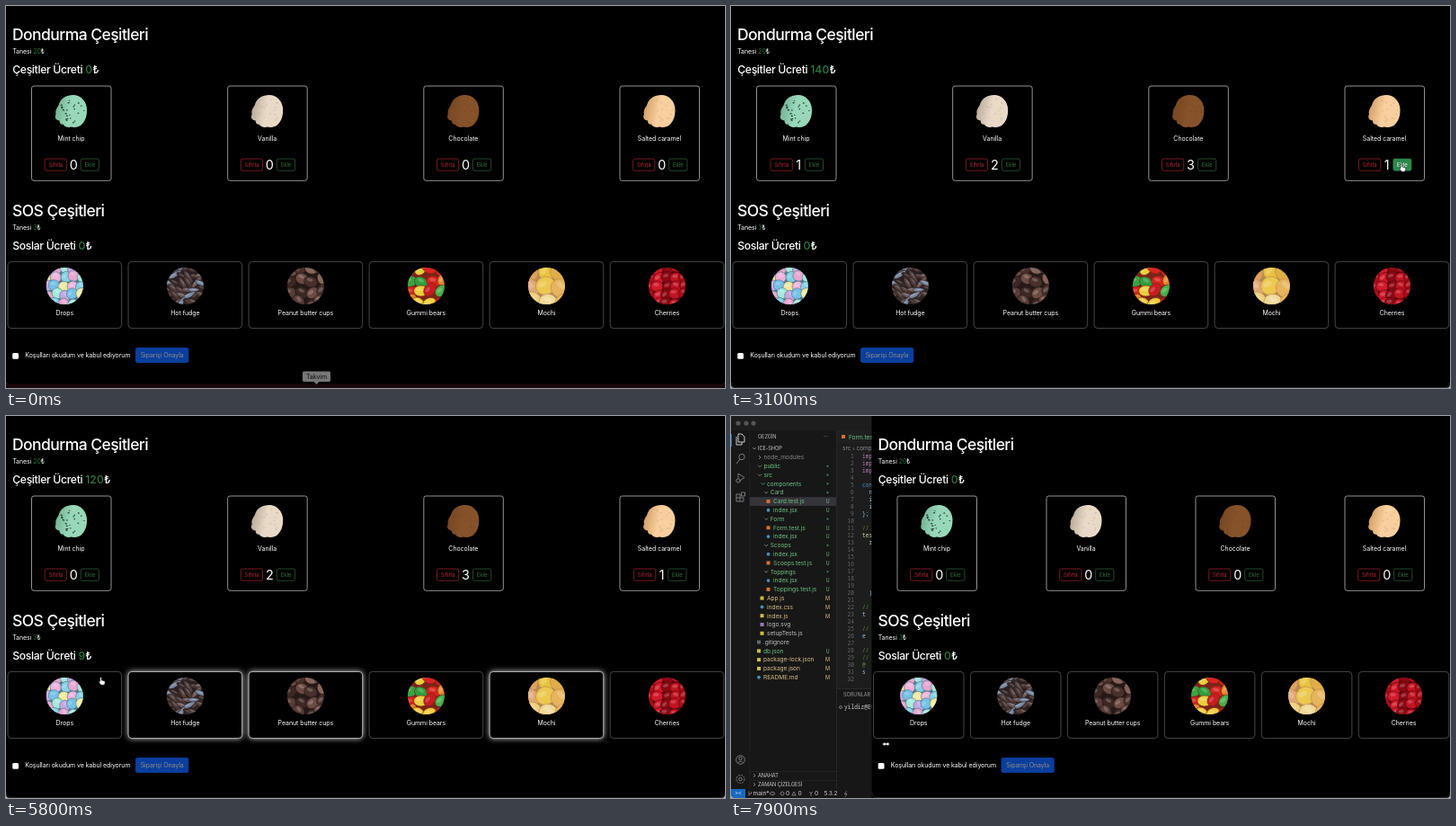
These frames come from a looping animation (800x425 px, 8 s). An HTML page:

```html
<!DOCTYPE html>
<html lang="tr">
<head>
<meta charset="utf-8">
<style>
html, body { margin: 0; width: 100%; height: 100%; overflow: hidden; background: #000; }
svg { display: block; width: 800px; height: 425px; }
text { font: 7px Inter, "Open Sans", sans-serif; letter-spacing: -.01em; fill: #fff; white-space: pre; }
.h1 { font-size: 17.5px; font-weight: 450; letter-spacing: -.032em; }
.h2 { font-size: 12.2px; font-weight: 450; letter-spacing: -.027em; }
.price { letter-spacing: .01em; }
.count { font-size: 14.4px; }
.btn { font-size: 6px; }
.mid { text-anchor: middle; }
.green { fill: #2c7c40; }
.ide { font-size: 6.6px; }
.tiny { font-size: 5.6px; }
.code { font: 6.2px "Noto Sans Mono", "DejaVu Sans Mono", monospace; letter-spacing: 0; }
.line { fill: none; stroke: #858585; stroke-width: .9; }
</style>
</head>
<body>
<svg id="stage" viewBox="0 0 800 425"></svg>
<script>
const LOOP = 8000, STEP = 100, EDGE = 156.5;
const stage = document.getElementById('stage');

let seed = 7;
const rand = () => (seed = seed * 16807 % 2147483647) / 2147483647;
const range = n => [...Array(n).keys()];
const text = (x, y, s, cls = '', fill = '') =>
  `<text x="${x}" y="${y}" class="${cls}"${fill && ` style="fill:${fill}"`}>${s}</text>`;
const rect = (x, y, w, h, fill, more = '') =>
  `<rect x="${x}" y="${y}" width="${w}" height="${h}" fill="${fill}" ${more}/>`;
const oval = (x, y, rx, ry, fill, more = '') =>
  `<ellipse cx="${x}" cy="${y}" rx="${rx}" ry="${ry}" fill="${fill}" ${more}/>`;

/* Code editor behind the page */
const TREE = [
  [0, 'node_modules', 'd', ''], [0, 'public', 'o', '•'], [0, 'src', 'o', '•'],
  [1, 'components', 'o', '•'], [2, 'Card', 'o', '•'], [3, 'Card.test.js', 't', 'U'],
  [3, 'index.jsx', 'x', 'U'], [2, 'Form', 'o', '•'], [3, 'Form.test.js', 't', 'U'],
  [3, 'index.jsx', 'x', 'U'], [2, 'Scoops', 'o', '•'], [3, 'index.jsx', 'x', 'U'],
  [3, 'Scoops.test.js', 't', 'U'], [2, 'Toppings', 'o', '•'], [3, 'index.jsx', 'x', 'U'],
  [3, 'Toppings.test.js', 't', 'U'], [1, 'App.js', 'j', 'M'], [1, 'index.css', 'x', 'M'],
  [1, 'index.js', 'j', 'M'], [1, 'logo.svg', 'v', ''], [1, 'setupTests.js', 'j', ''],
  [0, '.gitignore', 'g', ''], [0, 'db.json', 'j', 'U'], [0, 'package-lock.json', 'j', 'M'],
  [0, 'package.json', 'j', 'M'], [0, 'README.md', 'x', 'M']
];
const ICON = { t: '#d9702f', x: '#4b8fb5', j: '#cbbf45', v: '#a074c4', g: '#5a6a70' };
const STATUS = { U: '#6fbf84', '•': '#6fbf84', M: '#d9bd86', '': '#c0c0c0' };

const chevron = (x, y, open) =>
  `<path class="line" d="${open ? `M${x - 2} ${y - 1}l2 2 2-2` : `M${x - 1} ${y - 2}l2 2-2 2`}"/>`;

function treeRow([depth, name, kind, status], i) {
  const y = 46 + i * 9.79, folder = kind === 'd' || kind === 'o';
  const x = folder ? 32 + depth * 3.6 : [31, 34.5, 38, 41.5][depth];
  const nameX = folder ? x + 4.5 : x + (depth ? 5.6 : 5);
  const color = kind === 'd' ? '#858585' : STATUS[status];
  return (folder ? chevron(x, y, kind === 'o')
    : kind === 'x' ? oval(x, y, 1.9, 1.9, ICON.x) : rect(x - 2, y - 2, 4, 4, ICON[kind])) +
    text(nameX, y + 2.3, name, 'ide', color) +
    (status === '•' ? oval(107.5, y, 1.1, 1.1, '#4c8058') : text(107.5, y + 2.3, status, 'tiny mid', color));
}

const CODE = {
  1: 'imp', 2: 'imp', 3: 'imp', 5: 'cons', 6: '  n', 7: '  i', 8: '  i', 9: '};', 11: '//', 12: 'test',
  13: '  r', 20: '  )', 22: '//', 23: 't', 25: '//', 26: 'e', 28: '//', 29: '//', 30: '@', 31: 's'
};
const codeColor = s => s === '//' || s === '@' ? '#5f8a4a' : s === 'imp' ? '#b57db0'
  : s === 'cons' ? '#4f93c8' : s === 'test' ? '#d3d39d' : '#9cc5dc';

function editor() {
  const icons = `<g class="line">
    <path style="stroke:#ddd" d="M8 20h4l3 3v6H8zM6 23v9h6v-3"/>
    <circle cx="12" cy="45.5" r="3.2"/><path d="M10 48l-4 5"/>
    <path d="M8 64l7 4.5-6 4M8 64v5"/><circle cx="8" cy="72" r="2.2"/>
    <path d="M6 87h4v4h4v4H6zM6 91h4v4M11.5 85h4v4h-4z"/>
    <circle cx="10.5" cy="382.5" r="4.8"/><circle cx="10.5" cy="381" r="1.7"/><path d="M7.5 386q3-4 6 0"/>
    <circle cx="10.5" cy="404" r="4.5" stroke-dasharray="2 1"/><circle cx="10.5" cy="404" r="1.8"/></g>`;
  return rect(0, 0, 200, 425, '#1d1d1d') + rect(0, 16, 117, 399, '#171717') +
    [8, 17, 25].map(x => oval(x, 8, 2.6, 2.6, '#555')).join('') +
    rect(20.5, 16, .6, 399, '#292929') + rect(117, 16, .7, 399, '#2b2b2b') + rect(0, 20, .9, 14, '#2677d0') + icons +
    text(30, 25.3, 'GEZGİN', 'tiny', '#bbb') + text(103, 25, '···', 'ide', '#bbb') +
    chevron(26, 36, true) + text(30, 38.2, 'ICE-SHOP', 'tiny', '#ccc') +
    rect(21, 90.2, 96, 9.8, '#34343a') + TREE.map(treeRow).join('') +
    rect(21, 395, 96, .6, '#2b2b2b') + rect(21, 405, 96, .6, '#2b2b2b') +
    chevron(26, 400, false) + text(30, 402.2, 'ANAHAT', 'tiny', '#ccc') +
    chevron(26, 410, false) + text(30, 412.2, 'ZAMAN ÇİZELGESİ', 'tiny', '#ccc') +
    rect(118, 16, 82, 14, '#202020') + rect(123, 21, 4, 4, ICON.t) + text(131, 25.5, 'Form.test.js', 'ide', '#6fbf84') +
    text(124, 38, 'src › components', 'ide', '#8a8a8a') +
    range(32).map(i => {
      const n = i + 1, y = 47 + i * 8, s = CODE[n] || '';
      return text(n < 10 ? 133 : 129.5, y, n, 'code', '#666') + text(146, y, s, 'code', codeColor(s));
    }).join('') +
    rect(118, 303, 82, 112, '#171717') + rect(118, 303, 82, .7, '#333') +
    text(125, 312, 'SORUNLAR', 'tiny', '#999') +
    '<circle class="line" cx="122" cy="324" r="1.5"/>' + text(126, 326, 'yildiz@Ev-1', 'code', '#ccc') +
    rect(0, 415, 200, 10, '#171717') + rect(0, 415, 16, 10, '#1769c0') + text(8, 422, '&gt;&lt;', 'tiny mid') +
    '<path class="line" d="M20 417.5v5M20 421q3 0 3-3"/>' +
    text(24.5, 422.2, 'main*', 'ide', '#ccc') + '<ellipse class="line" cx="46" cy="420" rx="2.6" ry="1.7"/>' +
    '<circle class="line" cx="57" cy="420" r="2"/><path class="line" d="M70 418l2.2 4h-4.4z"/>' +
    text(61, 422.2, '0', 'ide', '#ccc') + text(74.5, 422.2, '0', 'ide', '#ccc') +
    '<path class="line" d="M87 418l2 2 2-2M89 420v3"/>' + text(93, 422.2, '0', 'ide', '#ccc') +
    text(103.5, 422.2, '5.3.2', 'ide', '#ccc') + '<path class="line" d="M128.5 417.5l-2 3h2.5l-2 3"/>';
}

/* Page */
const SCOOPS = [
  ['Mint chip', '#98d8b8', '#6fae90'], ['Vanilla', '#e9dac8', '#b3a595'],
  ['Chocolate', '#85522a', '#744620'], ['Salted caramel', '#f8cf9e', '#cf9a62']
];
const SCOOP_SHAPE = 'M-14-7C-12-15-5-18.5 2-18.5C11-18.5 17.5-11 17.5-2C17.5 5 16 10 12 14C10 17 4 18 0 17' +
  'C-3 18-8 17-9 14C-12 15-13 12-13 10C-17 10-19 6-17 3C-18-1-16-4-14-7Z';
const BTN = { reset: [14.7, 24.2, '#b82838', '#861c28', 'Sıfırla'], add: [54.7, 20.2, '#30713b', '#27532f', 'Ekle'] };
const HOVER = { reset: '#d03040', add: '#2a8a4c' };

function button(kind) {
  const [x, w, color, border, label] = BTN[kind];
  return `<g class="${kind}">${rect(x, 170, w, 13.2, 'none', `rx="1.8" stroke="${border}" stroke-width=".9"`)}
    ${rect(x, 170, w, 13.2, HOVER[kind], 'class="hover" rx="1.8"')}
    ${text(x + w / 2, 178.8, label, 'btn mid', color)}
    <g class="hover">${text(x + w / 2, 178.8, label, 'btn mid')}</g></g>`;
}

function scoop([name, light, dark], i) {
  const flecks = range(i ? 14 : 24).map(() => {
    const a = rand() * 6.283, r = Math.sqrt(rand()) * 14, size = i ? 1.3 : .7 + rand() * .5;
    return oval(Math.cos(a) * r + 1, Math.sin(a) * r - 1, size, size * .7, i ? dark : '#26382f', i ? 'opacity=".3"' : '');
  }).join('');
  return `<g class="scoop"><linearGradient id="ice${i}" x2="1" y2=".2">
    <stop offset=".05" stop-color="${dark}"/><stop offset=".55" stop-color="${light}"/></linearGradient>
    ${rect(0, 89, 88.5, 105.3, '#000', 'rx="2.5" stroke="#a4a4a4" stroke-width=".9"')}
    <g transform="translate(44 117.5)"><path d="${SCOOP_SHAPE}" fill="url(#ice${i})"/>${flecks}</g>
    ${text(44, 150.4, name, 'mid')}${button('reset')}${button('add')}
    ${text(46.6, 181.7, 0, 'count mid')}</g>`;
}

// name, background, colours in reading order, grid step, blob radii
const SAUCES = [
  ['Drops', '#547a8c', ['#86d2e4', '#e8a6d0', '#a6e8dc', '#c9a5e2', '#74c2e8', '#f0eaa0', '#efb4dc'], 10, 6.2, 6],
  ['Hot fudge', '#2a2022', ['#4a3836', '#6b5755', '#77879f', '#382826', '#54423f'], 7.5, 8, 2.6],
  ['Peanut butter cups', '#261917', ['#6b4b42', '#49302b', '#86655a', '#583c35', '#3c2723'], 12, 7.5, 6],
  ['Gummi bears', '#7c2418', ['#2f9e3e', '#e9cf3e', '#d8241f', '#d8241f', '#37a544', '#2f9e3e', '#d8241f', '#e4872e',
    '#d8241f', '#e9cf3e', '#c81c20', '#47b04a', '#e4872e', '#f0cc3e', '#f0cc3e', '#d8241f'], 12, 8, 6],
  ['Mochi', '#b98a50', ['#dfa05c', '#e8c33e', '#dfae4a', '#e0a878', '#ecc850', '#e6b45c', '#eed07a', '#f0d898', '#eeb65a'], 17, 11, 10],
  ['Cherries', '#5a060d', ['#b30e1b', '#d21a2b', '#8a0a14', '#c21422', '#a80c18'], 10, 6.8, 6]
];

function sauce([name, back, colors, step, rx, ry], i) {
  const cells = Math.ceil(42 / step), first = -(cells - 1) / 2;
  const blobs = range(cells * cells).map(n => {
    const [x, y] = [n % cells, Math.floor(n / cells)].map(k => (first + k + (rand() - .5) * .4) * step);
    return `<g transform="translate(${x} ${y}) rotate(${rand() * 120 - 60})">
      ${oval(0, 0, rx, ry, colors[n % colors.length], `stroke="${back}" stroke-width=".6"`)}
      ${oval(-rx * .2, -ry * .3, rx * .45, ry * .3, '#fff', 'opacity=".2"')}</g>`;
  }).join('');
  return `<g class="sauce">${rect(0, 284.4, 1, 74.2, '#000', 'class="frame" stroke-width=".9" rx="4"')}
    <g class="inside"><g transform="translate(0 311.5)" clip-path="url(#disc)">${rect(-21, -21, 42, 42, back)}${blobs}</g>
    ${text(0, 344, name, 'mid')}</g></g>`;
}

const heading = (y, title, unit, label, id) => text(7, y, title, 'h1') +
  text(7.2, y + 15.3, `Tanesi <tspan class="green">${unit}</tspan>₺`) +
  text(7.2, y + 37.2, `${label} <tspan class="price"><tspan id="${id}" class="green">0</tspan>₺</tspan>`, 'h2');

stage.innerHTML = `<defs><clipPath id="disc"><circle r="20.5"/></clipPath></defs>
  <g id="editor">${editor()}</g>
  <rect id="page" width="800" height="425"/>
  <path id="base" fill="none" stroke="#333" stroke-width=".8"/>
  <path d="M0 421v4h4q-4 0-4-4M800 421v4h-4q4 0 4-4" fill="#bbb"/>
  <g id="left">${heading(38, 'Dondurma Çeşitleri', 20, 'Çeşitler Ücreti', 'scoopPrice')}
    ${heading(233.5, 'SOS Çeşitleri', 3, 'Soslar Ücreti', 'saucePrice')}
    <rect id="check" x="7.2" y="386" width="6.8" height="6.8" rx="1.5"/>
    <path id="tick" d="M8.8 389.5l1.4 1.5 2.4-3" fill="none" stroke="#fff"/>
    ${text(21.3, 391.3, 'Koşulları okudum ve kabul ediyorum')}
    <g id="submit">${rect(144, 380, 59.3, 17, '#1160f2', 'rx="2.7"')}${text(173.7, 391.2, 'Siparişi Onayla', 'mid', '#dcd8d0')}</g></g>
  ${SCOOPS.map(scoop).join('')}${SAUCES.map(sauce).join('')}
  <g id="tooltip"><rect y="420.5" width="800" height="4.5" fill="#170a0d"/>
    <path d="M331.5 406.500h28q1.5 0 1.5 1.5v8.5q0 1.5-1.5 1.5H348.5l-3 3-3-3H331.5q-1.5 0-1.5-1.5V408q0-1.5 1.5-1.5z" fill="#777"/>
    ${text(345.5, 414.6, 'Takvim', 'mid', '#111')}</g>
  <g id="cursor" stroke="#000" stroke-width=".5" fill="#fff" stroke-linejoin="round">
    <path d="M0 0v7.2l1.7-1.5 1.2 2.6 1.2-.6-1.2-2.5h2.3z"/>
    <path d="M-.9.3Q0-.8.8.3V3l3 .7q1 .3.9 1.5L4 8.2H.2L-2.3 5q-.2-1.3 1.4-.4z"/>
    <path d="M-4 0l2.8-2.6v1.6h2.4v-1.6L4 0 1.2 2.6V1h-2.4v1.6z"/></g>`;

/* Timeline */
const PATH = [
  [100, 345, 423], [800, 100, 181], [1000, 100, 181], [1300, 312, 176], [1700, 312, 176],
  [2000, 539, 170.5], [2200, 535, 174], [2600, 535, 174], [2900, 746, 176], [3100, 746, 176],
  [3600, 258, 320], [3800, 222, 334], [3900, 222, 334], [4200, 325.5, 338.5], [4400, 325.5, 338.5],
  [4700, 600, 338], [4900, 600, 338], [5400, 56, 176], [5500, 56, 176], [5800, 105.5, 291],
  [6100, 10, 387], [6200, 10, 387], [6500, 157, 389], [7100, 157, 389], [7400, 1, 365],
  [7500, 1, 365], [7900, 172.5, 365]
];
const ADDS = [[1000], [1500, 1700], [2200, 2400, 2600], [3000]];
const PICKS = [Infinity, 3900, 4300, Infinity, 4800, Infinity];
const RESET_MINT = 5500, CHECKED = 6200, ORDERED = 6700;
const ease = p => p * p * (3 - 2 * p);
const clamp = p => Math.max(0, Math.min(1, p));

function pointer(t) {
  const i = PATH.findIndex(k => k[0] > t);
  if (i === 0) return PATH[0].slice(1);
  if (i < 0) return PATH[PATH.length - 1].slice(1);
  const [t0, x0, y0] = PATH[i - 1], [t1, x1, y1] = PATH[i], p = ease((t - t0) / (t1 - t0));
  return [x0 + (x1 - x0) * p, y0 + (y1 - y0) * p];
}
const $ = id => document.getElementById(id);
const all = s => [...stage.querySelectorAll(s)];
const set = (node, attrs) => Object.entries(attrs).forEach(([k, v]) => node.setAttribute(k, v));
const show = (node, on) => set(node, { visibility: on ? 'visible' : 'hidden' });
const scoopNodes = all('.scoop'), sauceNodes = all('.sauce');
const scoopX = (i, left) => left + 28.5 + i * (654.5 - left) / 3;

function over(kind, i, t) {
  const [x, y] = pointer(t), [bx, w] = BTN[kind], dx = x - scoopX(i, 0) - bx;
  return t < 7300 && dx >= 0 && dx <= w + .6 && y >= 170 && y <= 183.5 ? 1 : 0;
}

function render(t) {
  const left = EDGE * ease(clamp((t - 7500) / 400));
  const done = t >= ORDERED;
  let handed = false;
  show($('editor'), left > 0);
  set($('page'), { x: left });
  set($('base'), { d: `M${left + .4} 419q0 5.5 5 5.5H795q4.6 0 4.6-5.5` });
  set($('left'), { transform: `translate(${left})` });

  const counts = ADDS.map((times, i) => done || (i === 0 && t >= RESET_MINT) ? 0 : times.filter(a => t >= a).length);
  scoopNodes.forEach((node, i) => {
    set(node, { transform: `translate(${scoopX(i, left)})` });
    node.querySelector('.count').textContent = counts[i];
    for (const kind of ['reset', 'add']) {
      const group = node.querySelector('.' + kind), now = over(kind, i, t);
      const shift = counts[i] === 1 ? (kind === 'add' ? -.9 : .9) : 0;
      set(group, { transform: `translate(${shift})` });
      group.querySelectorAll('.hover').forEach(h => set(h, { opacity: (now + over(kind, i, t - STEP)) / 2 }));
      handed = handed || now;
    }
  });

  const pitch = (804.2 - left) / 6, width = pitch - 7.4;
  const picked = PICKS.map(p => t >= p && !done);
  sauceNodes.forEach((node, i) => {
    const frame = node.querySelector('.frame');
    set(node, { transform: `translate(${left + 2 + i * pitch})` });
    set(frame, { width, stroke: picked[i] ? '#c8c8c8' : '#505050' });
    frame.style.filter = picked[i] ? 'drop-shadow(0 0 3px #bbb)' : 'none';
    set(node.querySelector('.inside'), { transform: `translate(${width / 2})` });
  });

  $('scoopPrice').textContent = 20 * counts.reduce((a, b) => a + b);
  $('saucePrice').textContent = 3 * picked.filter(Boolean).length;
  const checked = t >= CHECKED && !done;
  set($('check'), { fill: checked ? '#0d6efd' : '#fff' });
  show($('tick'), checked);
  set($('submit'), { opacity: checked ? 1 : .65 });
  show($('tooltip'), t < 300);

  const [x, y] = pointer(t);
  const onCard = y >= 284 && y <= 359 && t < 7100;
  const onSubmit = checked && x > 144 && y > 380;
  const shape = t >= 7400 ? 2 : handed || onCard || onSubmit ? 1 : 0;
  set($('cursor'), { transform: `translate(${x} ${y})` });
  show($('cursor'), t >= 100);
  [...$('cursor').children].forEach((c, i) => set(c, { display: i === shape ? 'inline' : 'none' }));
}

const start = performance.now();
function tick() {
  const t = (performance.now() - start) % LOOP;
  render(Math.floor(t / STEP) * STEP);
  requestAnimationFrame(tick);
}
tick();
</script>
</body>
</html>
```
